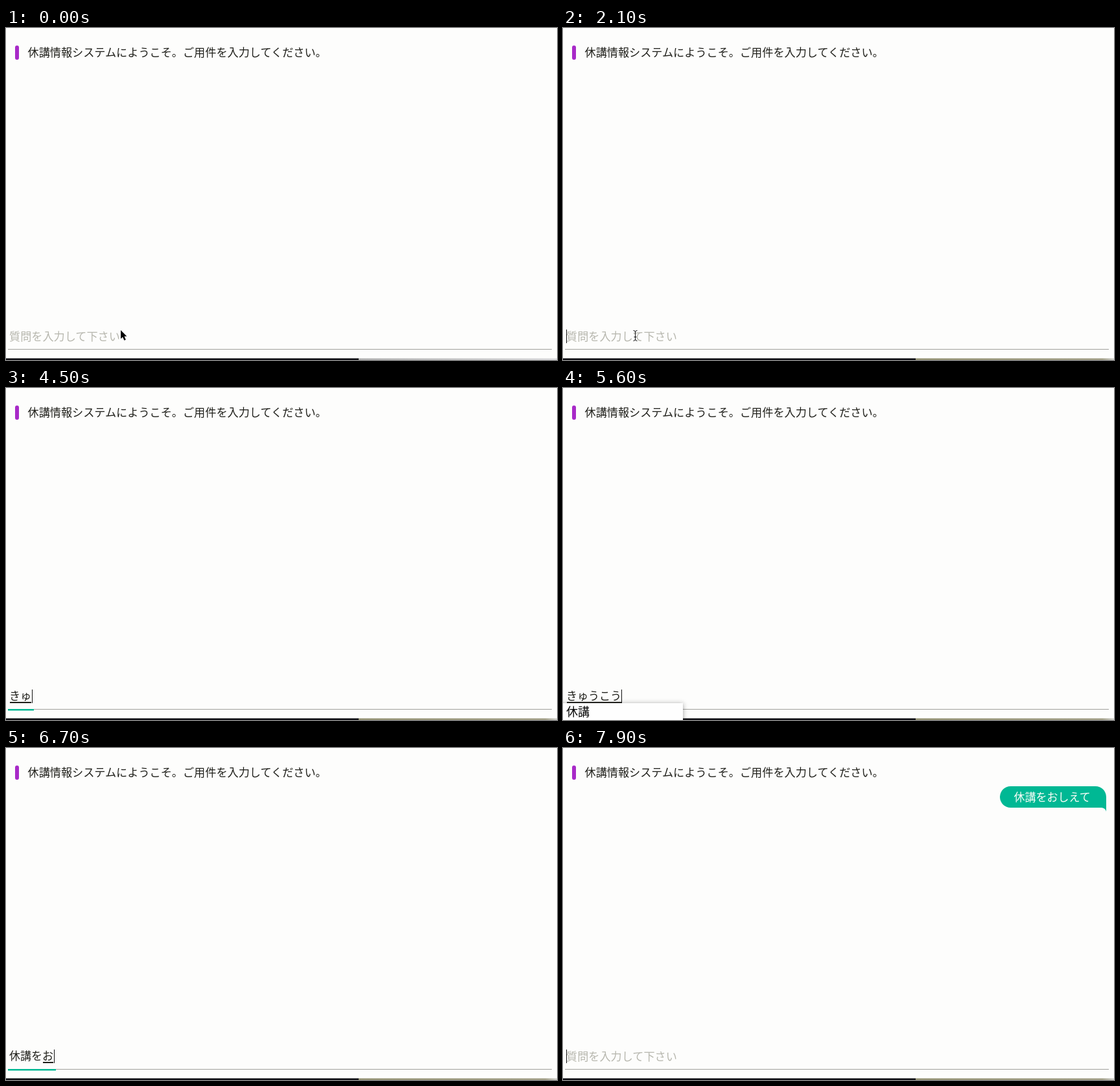
An HTML page that plays this animation: 850 px wide and 512 px high, repeating every 8 s.

```html
<!DOCTYPE html>
<html lang="ja">
<head>
<meta charset="utf-8">
<title>Chat</title>
<style>
  html, body { margin: 0; width: 100%; height: 100%; overflow: hidden; background: #fdfdfc; }
  svg { display: block; }
  text { font: 17px "Noto Sans CJK JP", "Noto Sans CJK", sans-serif; fill: #1f1f1a; white-space: pre; }
  #hello, #hint { font-size: 17.15px; }
  #hint { fill: #b7b7ae; }
</style>
</head>
<body>
<svg width="850" height="512" viewBox="0 0 850 512">
  <defs>
    <linearGradient id="idle">
      <stop offset="0" stop-color="#b2b2b2"/>
      <stop offset="1" stop-color="#dadadc"/>
    </linearGradient>
    <linearGradient id="active">
      <stop offset="0" stop-color="#969476"/>
      <stop offset=".94" stop-color="#a3a088"/>
      <stop offset="1" stop-color="#d0d0cc"/>
    </linearGradient>
    <filter id="shadow" x="-10%" y="-50%" width="120%" height="200%">
      <feDropShadow dx="0" dy="1" stdDeviation="3.5" flood-color="#333" flood-opacity=".5"/>
    </filter>
  </defs>

  <rect x="14" y="27" width="6" height="22" rx="3" fill="#a82ac8"/>
  <text id="hello" x="33.5" y="44">休講情報システムにようこそ。ご用件を入力してください。</text>

  <g id="reply">
    <path d="M690.5 59h131a16.5 16.5 0 0 1 16.5 16.5V98q-1-5-7-6H690.5a16.5 16.5 0 0 1 0-33z" fill="#00b894"/>
    <text x="695.5" y="82" style="fill:#fdfdf8">休講をおしえて</text>
  </g>

  <rect x="3" y="495" width="839" height="1" fill="#a0a09c"/>
  <rect y="509.4" width="544" height="3" fill="#111116"/>
  <rect id="strip" x="544" y="509.4" width="306" height="3"/>

  <text id="hint" x="5" y="482">質問を入力して下さい</text>
  <text id="typed" x="5" y="481"></text>
  <rect id="bar" x="3" y="495" height="2.5" fill="#00b894"/>
  <rect id="under" y="484" height="2" fill="#1f1f1a"/>
  <g id="popup">
    <rect x="-10" y="486" width="195" height="40" fill="#fefefe" filter="url(#shadow)"/>
    <text x="5" y="505.5" style="font-size:18px;fill:#000">休講</text>
  </g>
  <rect id="caret" y="465" width="1" height="21" fill="#111"/>

  <path id="arrow" d="M0 0V13.2L3 10.4L5.4 15.8L7.8 14.8L5.5 9.5H9.4Z" fill="#000" stroke="#fff" paint-order="stroke"/>
  <path id="beam" d="M108.5 466.5q3 0 3 2.5v11q0 2.5-3 2.5M114.5 466.5q-3 0-3 2.5v11q0 2.5 3 2.5M109.5 476.5h4" fill="none" stroke="#111"/>
</svg>
<script>
const LOOP = 8000, EM = 16.9, FOCUS = 1700, SEND = 7800;
const $ = id => document.getElementById(id);
const show = (id, on) => $(id).style.display = on ? "" : "none";

// [time, confirmed text, text still being composed]
const typing = [
  [0, "", ""], [4000, "", "ｋ"], [4200, "", "き"], [4300, "", "きｙ"], [4500, "", "きゅ"],
  [4700, "", "きゅう"], [4900, "", "きゅうｋ"], [5000, "", "きゅうこ"], [5300, "", "きゅうこう"],
  [5800, "", "休講"], [6100, "休講", "ｗ"], [6200, "休講", "を"], [6500, "休講を", ""],
  [6600, "休講を", "お"], [6800, "休講を", "おｓ"], [6900, "休講を", "おし"],
  [7100, "休講を", "おしえ"], [7300, "休講を", "おしえｔ"], [7400, "休講を", "おしえて"],
  [7600, "休講をおしえて", ""], [SEND, "", ""]
];
const path = [[0, 177, 466], [700, 125, 470], [1300, 111, 473]];

function pointer(t) {
  const i = t < path[1][0] ? 0 : 1;
  const [t0, x0, y0] = path[i], [t1, x1, y1] = path[i + 1];
  const k = Math.min(1, (t - t0) / (t1 - t0)), e = k * k * (3 - 2 * k);
  return [x0 + (x1 - x0) * e, y0 + (y1 - y0) * e];
}

function draw(t) {
  const [, done, draft] = typing.filter(s => s[0] <= t).pop();
  const text = done + draft, end = Math.round(5.9 + text.length * EM);
  const since = t >= SEND ? t - SEND : t - FOCUS;

  $("typed").textContent = text;
  show("hint", !text);
  show("reply", t >= SEND);
  show("popup", t >= 5400 && t < 5900);
  $("bar").setAttribute("width", text ? end : 0);
  $("under").setAttribute("x", Math.round(6 + done.length * EM));
  $("under").setAttribute("width", draft ? Math.round(draft.length * EM) - 1 : 0);
  $("caret").setAttribute("x", text ? end : 5);
  show("caret", t >= FOCUS && (text || since % 1000 < 500));
  $("strip").setAttribute("fill", `url(#${t < FOCUS ? "idle" : "active"})`);

  show("arrow", t < FOCUS);
  $("arrow").setAttribute("transform", `translate(${pointer(t)})`);
  show("beam", t >= FOCUS && t < 4000);
}

function tick() {
  draw(Math.floor(performance.now() % LOOP / 100) * 100);
  requestAnimationFrame(tick);
}
tick();
</script>
</body>
</html>
```
